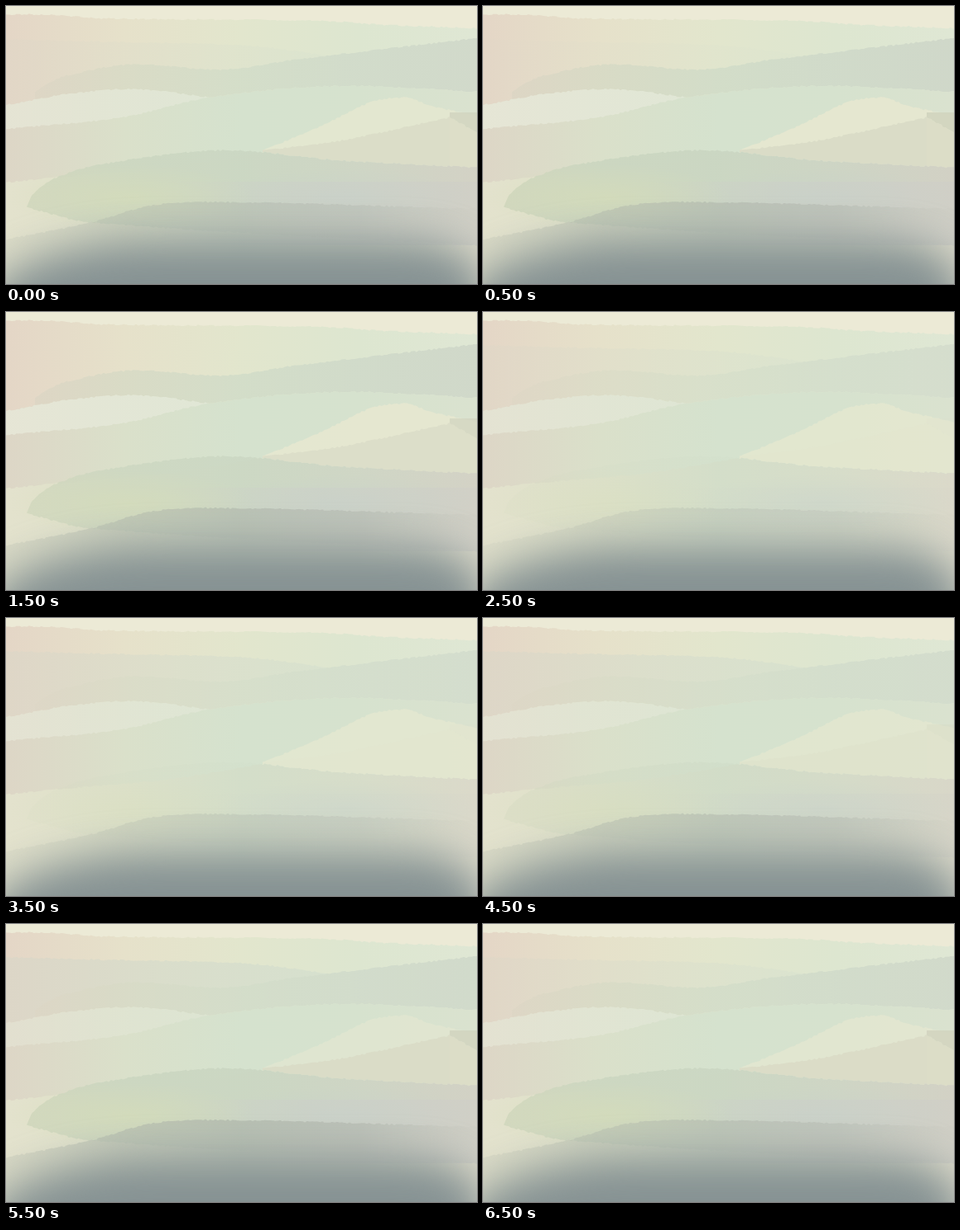
An HTML page with a canvas that plays this animation: 569 px wide and 337 px high, repeating every 7000 ms.

```html
<!DOCTYPE html>
<html lang="en">
<head>
<meta charset="utf-8">
<title>Misty hills</title>
<style>
html, body { margin: 0; width: 100%; height: 100%; overflow: hidden; background: #ecead6; }
canvas { display: block; width: 569px; height: 337px; }
</style>
</head>
<body>
<canvas id="stage" width="569" height="337"></canvas>
<script>
const W = 569, H = 337, STEP = 500, STEPS = 14;
const ctx = document.getElementById('stage').getContext('2d');

const pairs = list => list.flatMap((v, i) => i % 2 ? [] : [[v, list[i + 1]]]);

// Eased, looping value through step,value keys
function keys(...list) {
  const k = pairs(list);
  k.push([k[0][0] + STEPS, k[0][1]]);
  return step => {
    const s = step < k[0][0] ? step + STEPS : step;
    const i = k.findIndex((key, n) => n && s <= key[0]);
    const [s0, v0] = k[i - 1], [s1, v1] = k[i];
    return v0 + (v1 - v0) * (0.5 - 0.5 * Math.cos(Math.PI * (s - s0) / (s1 - s0)));
  };
}

// How strongly each layer stands out from the mist
const strength = {
  haze: keys(0, .3, 2, 0, 4, .04, 6, .7, 8, .7, 11, .95),
  ridge: keys(2, .95, 6, .4, 8, .4, 13, .72),
  mist: keys(2, 1, 6, .75, 8, .75, 11, .57),
  mound: keys(0, .85, 2, 1, 5, .12, 8, .12, 11, .9),
  front: keys(0, .65, 2, 1, 5, .45, 7, .5, 11, 1)
};

const rough = (x, seed) => {
  const s = Math.sin(Math.floor(x / 3) * 12.9898 + seed * 78.233) * 43758.5453;
  return s - Math.floor(s) - 0.5;
};

// Smooth curve through x,y points, with a slightly ragged line
function edge(...list) {
  const p = pairs(list), last = p.length - 1;
  const tangent = i => {
    const a = p[Math.max(i - 1, 0)], b = p[Math.min(i + 1, last)];
    return (b[1] - a[1]) / (b[0] - a[0]);
  };
  return x => {
    let i = 0;
    while (i < last - 1 && x > p[i + 1][0]) i++;
    const [x0, y0] = p[i], [x1, y1] = p[i + 1], d = x1 - x0;
    const t = Math.min(1, Math.max(0, (x - x0) / d)), u = 1 - t;
    return u * u * (1 + 2 * t) * y0 + t * t * (3 - 2 * t) * y1 +
      d * t * u * (u * tangent(i) - t * tangent(i + 1)) + 1.6 * rough(x, list[1]);
  };
}

const level = y => () => y;
const floor = level(H);
const skyline = edge(0, 10, 60, 11, 120, 15, 380, 18, 460, 23, W, 27);
const ridgeTop = edge(35, 104, 50, 94, 75, 84, 150, 71, 265, 77, 350, 65, W, 39);
const hazeLeft = edge(0, 40, 100, 43, 290, 48, 390, 60);
const hazeTop = x => x < 390 ? hazeLeft(x) : ridgeTop(x);
const plainTop = edge(0, 149, 140, 135, 245, 111, 400, 97, W, 104);
const mistLeft = edge(0, 120, 80, 106, 160, 101, 245, 111);
const mistTop = x => x < 245 ? mistLeft(x) : plainTop(x);
const fieldTop = edge(310, 175, 380, 146, 440, 117, 485, 111, 510, 120, W, 133);
const slopeTop = edge(310, 175, 400, 164, 536, 135);
const slopeEnd = edge(536, 135, W, 153);
const moundTop = edge(25, 243, 32, 229, 57, 210, 110, 193, 260, 175, 400, 187, W, 196);
const moundFoot = edge(25, 244, 100, 262, W, 290);
const lowLeft = edge(0, 214, 70, 207, 200, 195, 310, 177);
const lowTop = x => x < 310 ? lowLeft(x) : moundTop(x);
const frontTop = edge(0, 283, 100, 263, 180, 241, 280, 238, W, 246);

// Horizontal gradient of evenly spaced colours
function tint(...colors) {
  const g = ctx.createLinearGradient(0, 0, W, 0);
  colors.forEach((c, i) => g.addColorStop(i / (colors.length - 1), c));
  return g;
}

const warm = tint('#e4d6c6', '#e6e1ca', '#e2e6cd', '#dde6d0', '#dfe7d4');
const hazy = tint('#dcd6c7', '#d9ddcb', '#d6e0ce', '#d5e0cf');
const ridge = tint('#ded4c4', '#d7dac5', '#d1dcc8', '#cfd9c9', '#ced6c8');
const pale = tint('#e6e6d6', '#e0e7d6', '#dee7d6');
const plain = tint('#ddd6c6', '#dae0ca', '#d5e2ce', '#d6e2ce', '#dae2cf');
const low = tint('#e3e2cd', '#dee1ca', '#d5dfca', '#d8deca', '#dcdaca');
const mound = tint('#d0d6bc', '#cbd6c0', '#cad6c2', '#cdd4c4', '#d1d0c4');
const bank = tint('#cdcfc800', '#cdcfc800', '#cdcfc8', '#cfcec7');
const front = tint('#b4baac60', '#b1b8acd0', '#afb7ab', '#b1b6add8', '#b8bbb118');

function band(top, foot, fill, alpha = 1, from = 0, to = W) {
  ctx.beginPath();
  for (let x = from; x <= to; x++) ctx.lineTo(x, top(x));
  for (let x = to; x >= from; x--) ctx.lineTo(x, foot(x));
  ctx.globalAlpha = alpha;
  ctx.fillStyle = fill;
  ctx.fill();
}

function glow(x, y, rx, ry, color, alpha) {
  ctx.save();
  ctx.translate(x, y);
  ctx.scale(rx, ry);
  const g = ctx.createRadialGradient(0, 0, 0, 0, 0, 1);
  g.addColorStop(0, color);
  g.addColorStop(1, color + '00');
  ctx.globalAlpha = alpha;
  ctx.fillStyle = g;
  ctx.fillRect(-1, -1, 2, 2);
  ctx.restore();
}

// Dark haze rising from the bottom edge
function groundHaze() {
  ctx.save();
  ctx.globalAlpha = 1;
  ctx.filter = 'blur(24px)';
  ctx.fillStyle = '#869293';
  ctx.beginPath();
  ctx.roundRect(-20, 287, W + 30, 200, [{ x: 200, y: 75 }, { x: 90, y: 60 }, 0, 0]);
  ctx.fill();
  ctx.restore();
}

function draw(step) {
  const s = {};
  for (const name in strength) s[name] = strength[name](step);

  band(level(0), floor, '#ecead6');
  band(skyline, floor, warm);
  band(hazeTop, mistTop, hazy, s.haze);
  band(ridgeTop, mistTop, ridge, s.ridge, 35);
  band(mistTop, floor, plain);
  band(mistTop, plainTop, pale, s.mist, 0, 245);
  band(fieldTop, moundTop, '#e6e8d1', s.mist, 310);
  band(slopeTop, moundTop, '#dadcc7', s.mound, 310, 536);
  band(slopeEnd, moundTop, '#dcddc7', s.mound, 536);
  band(level(129), slopeEnd, '#d2d5c0', s.mound, 536);
  band(lowTop, floor, low);
  band(moundTop, moundFoot, mound, s.mound, 25);
  band(level(213), level(290), bank, s.mound * .7);
  glow(150, 232, 150, 40, '#d8deb6', .2 + s.mound * .35);
  glow(410, 232, 160, 36, '#c4d0cc', .35);
  band(frontTop, floor, front, s.front * .72);
  groundHaze();
}

let shown = -1;
const start = performance.now();
function tick(now) {
  const step = Math.floor(Math.max(0, now - start) / STEP) % STEPS;
  if (step !== shown) draw(shown = step);
  requestAnimationFrame(tick);
}
tick(start);
</script>
</body>
</html>
```
